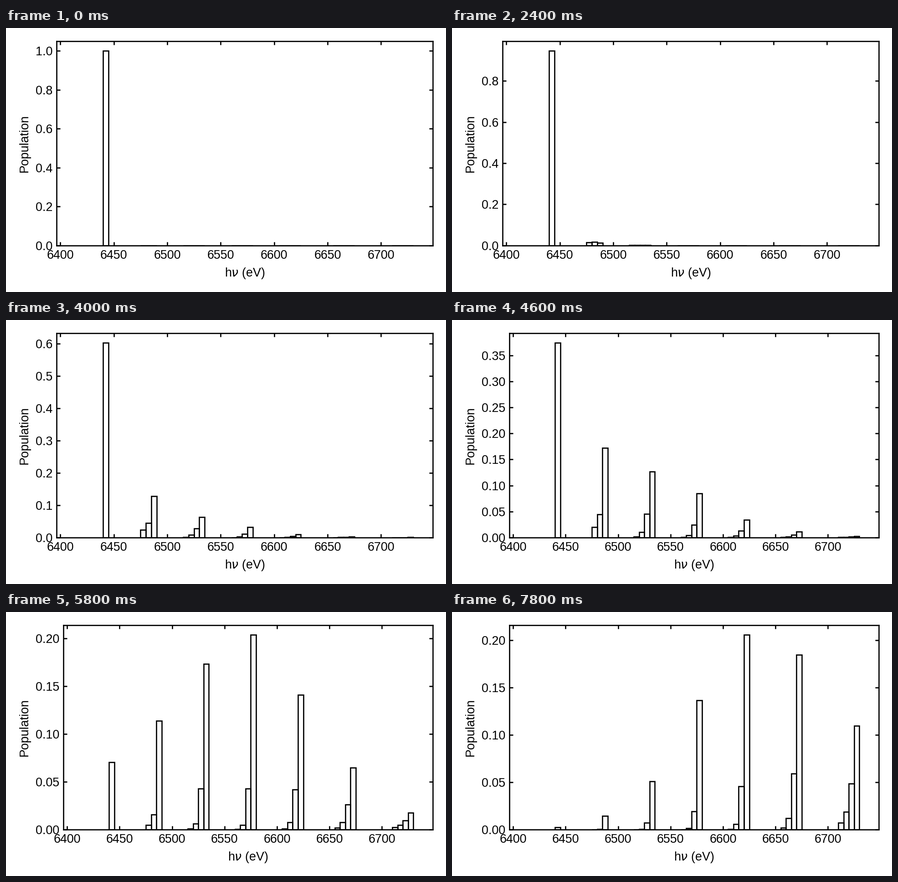
Animation of 966 by 580 pixels, one loop 8000 ms. Source, as a matplotlib script:

```python
import math
from collections import namedtuple

import matplotlib.pyplot as plt
from matplotlib.animation import FuncAnimation

W, H, DPI = 966, 580, 193.2
FRAMES, STEP = 40, 200
BIN = 5

plt.rcParams.update({
    "font.family": "Liberation Sans", "font.size": 10,
    "axes.linewidth": 1,
    "xtick.direction": "in", "ytick.direction": "in",
    "xtick.top": True, "ytick.right": True,
    "xtick.major.size": 3, "ytick.major.size": 3,
    "xtick.major.width": 1, "ytick.major.width": 1,
})

# A charge state's main line follows scale * d**power * exp(-decay * d),
# d being the absorbed dose; side bins below it fall off by drop and spread.
Ion = namedtuple("Ion", "edge sides scale power decay drop spread")
NEUTRAL_EDGE = 6440
IONS = [
    Ion(6485, 2, .432, 1.03, .875, 1.25, .65),
    Ion(6530, 3, .284, 1.55, .75, 1.05, 1.25),
    Ion(6575, 3, .159, 1.8, .563, 1.36, 1.25),
    Ion(6620, 3, .0545, 2.05, .39, 1.07, 1.25),
    Ion(6670, 3, .01438, 2.1, .2, .79, 1.25),
    Ion(6725, 3, .00243, 1.7, -.13, .52, 1.1),
]


def pulse(t, total, center, width):
    """Running integral of a Gaussian pulse."""
    return total / 2 * (1 + math.erf((t - center) / (width * math.sqrt(2))))


def dose(t):
    """Main pulse plus its weak early foot."""
    return pulse(t, 7.25, 6345, 1575) + pulse(t, .012, 1700, 400)


def populations(t):
    d = dose(t)
    relaxed = d / (d + .04)
    out = [math.exp(-d)]
    for q, ion in enumerate(IONS, 1):
        peak = ion.scale * d ** ion.power * math.exp(-ion.decay * d)
        fall = (ion.drop + .32 * d / q) * relaxed ** 3
        out.append(peak * relaxed)
        out += [peak * math.exp(-fall * j ** ion.spread)
                for j in range(1, ion.sides + 1)]
    return out


edges = [NEUTRAL_EDGE] + [ion.edge - BIN * j for ion in IONS
                          for j in range(ion.sides + 1)]

fig, ax = plt.subplots(figsize=((W + 1e-6) / DPI, (H + 1e-6) / DPI), dpi=DPI)
fig.set_facecolor("white")
bars = ax.bar(edges, [0] * len(edges), width=BIN, align="edge",
              fill=False, edgecolor="black", linewidth=1)
ax.set_xlim(6396.5, 6748.5)
ax.set_xlabel(r"h$\nu$ (eV)")
ax.set_ylabel("Population")


def fit_margins():
    # Start from fixed margins so every loop is identical.
    fig.subplots_adjust(left=.115, right=.97, bottom=.175, top=.95)
    fig.tight_layout()
    pars = fig.subplotpars
    fig.subplots_adjust(left=pars.left - 1.2 / W, bottom=pars.bottom - 3 / H)


def draw(n):
    heights = populations(n * STEP)
    for bar, h in zip(bars, heights):
        bar.set_height(h)
    ax.set_ylim(0, 1.05 * max(heights))
    fit_margins()
    return list(bars)


anim = FuncAnimation(fig, draw, frames=FRAMES, interval=STEP,
                     init_func=lambda: draw(0), blit=False,
                     repeat=True, repeat_delay=0)
plt.show()
```
